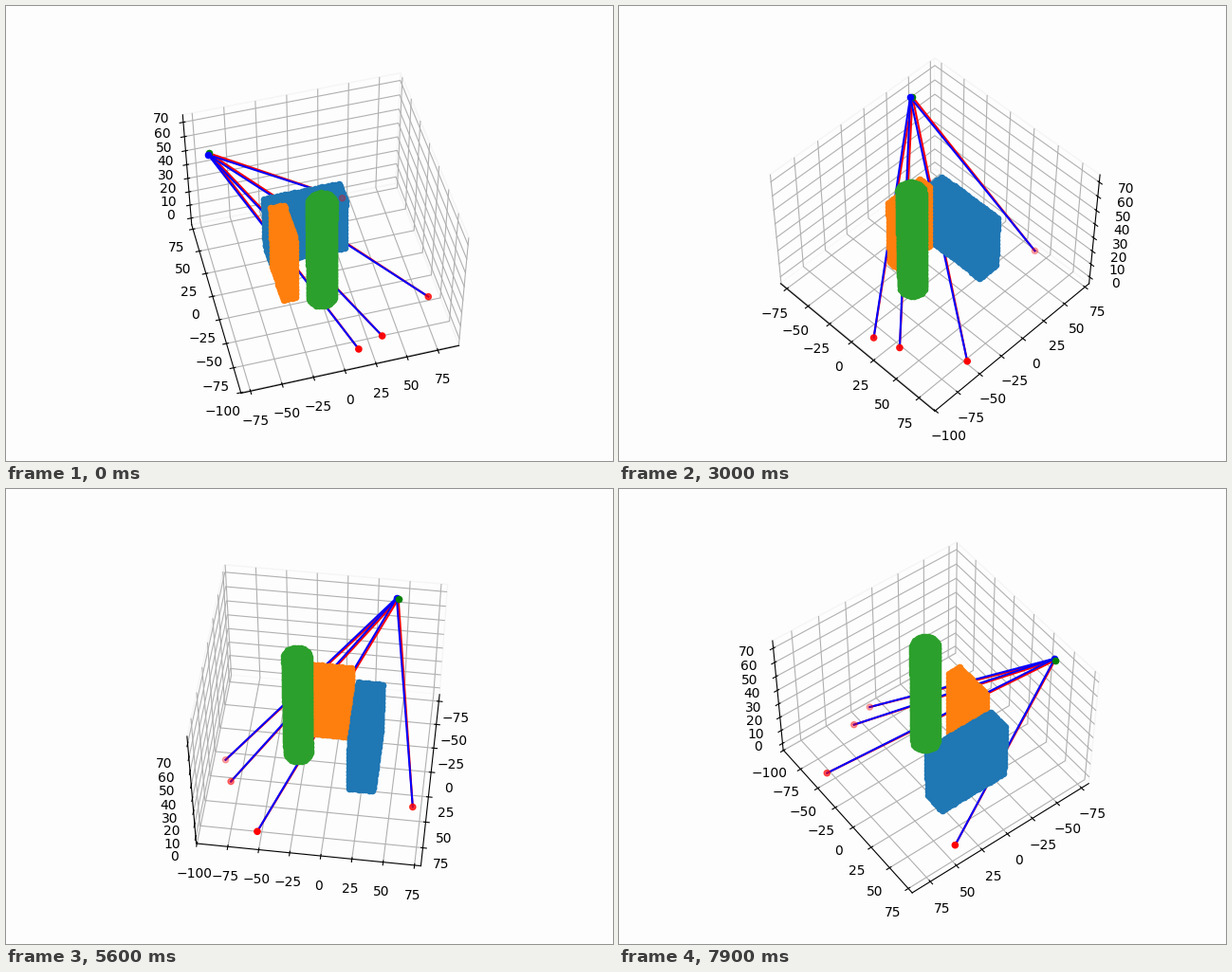
Write a matplotlib script that moves like this. It is 640 px wide and 480 px high and loops after 8000 ms.

```python
import numpy as np
import matplotlib.pyplot as plt
from matplotlib.animation import FuncAnimation

BG = "#fdfdfd"
FRAMES, INTERVAL = 80, 100
ELEV, AZIM_START, AZIM_STEP = 50, -105, 2

RECEIVERS = np.array([(14, -89.1, 0), (35.1, -81.3, 0),
                      (81.1, -52.6, 0), (42.8, 68.6, 0)])
TRUE_POS = (-70.3, 42, 70)
ESTIMATE = (-71.3, 40.5, 70)


def padded(lo, hi):
    """Axis limits with the usual 5 % data margin plus the 3D view margin."""
    pad = (hi - lo) * (0.05 + 1.1 / 48)
    return lo - pad, hi + pad


def span(lo, hi, step=2.8):
    return np.linspace(lo, hi, int(np.ceil((hi - lo) / step)) + 1)


def box(xs, ys, zs):
    grid = np.meshgrid(span(*xs), span(*ys), span(*zs))
    return [g.ravel() for g in grid]


def cylinder(cx, cy, radius, zs):
    r, a, z = np.meshgrid([radius, radius * 0.7, radius * 0.35],
                          np.linspace(0, 2 * np.pi, 28, endpoint=False),
                          span(*zs))
    return [g.ravel() for g in (cx + r * np.cos(a), cy + r * np.sin(a), z)]


fig = plt.figure(figsize=(6.4, 4.8), dpi=100, facecolor=BG)
ax = fig.add_subplot(projection="3d", facecolor=BG)

for axis in (ax.xaxis, ax.yaxis, ax.zaxis):
    axis.set_pane_color((0.96, 0.96, 0.96, 1))
    axis.pane.set_facecolor(BG)

solids = [
    (box((-30.5, 30.5), (15.4, 34.6), (0, 35)), "C0"),
    (box((-30.5, -20.5), (-26, 9.5), (1, 45)), "C1"),
    (cylinder(-0.5, -30.6, 9.8, (0.7, 70)), "C2"),
]
for points, color in solids:
    ax.scatter(*points, color=color, depthshade=False)

for start, color in ((TRUE_POS, "red"), (ESTIMATE, "blue")):
    for end in RECEIVERS:
        ax.plot(*zip(start, end), color=color)

ax.scatter(*RECEIVERS.T, color="red")
ax.scatter(*TRUE_POS, color="green")
ax.scatter(*ESTIMATE, color="blue")

ax.set_xlim(*padded(-71.3, 81.1))
ax.set_ylim(*padded(-89.1, 68.6))
ax.set_zlim(*padded(0, 70))


def update(i):
    ax.view_init(elev=ELEV, azim=AZIM_START + AZIM_STEP * i)
    return []


anim = FuncAnimation(fig, update, frames=FRAMES, interval=INTERVAL,
                     repeat=True, repeat_delay=0, blit=False)
plt.show()
```
